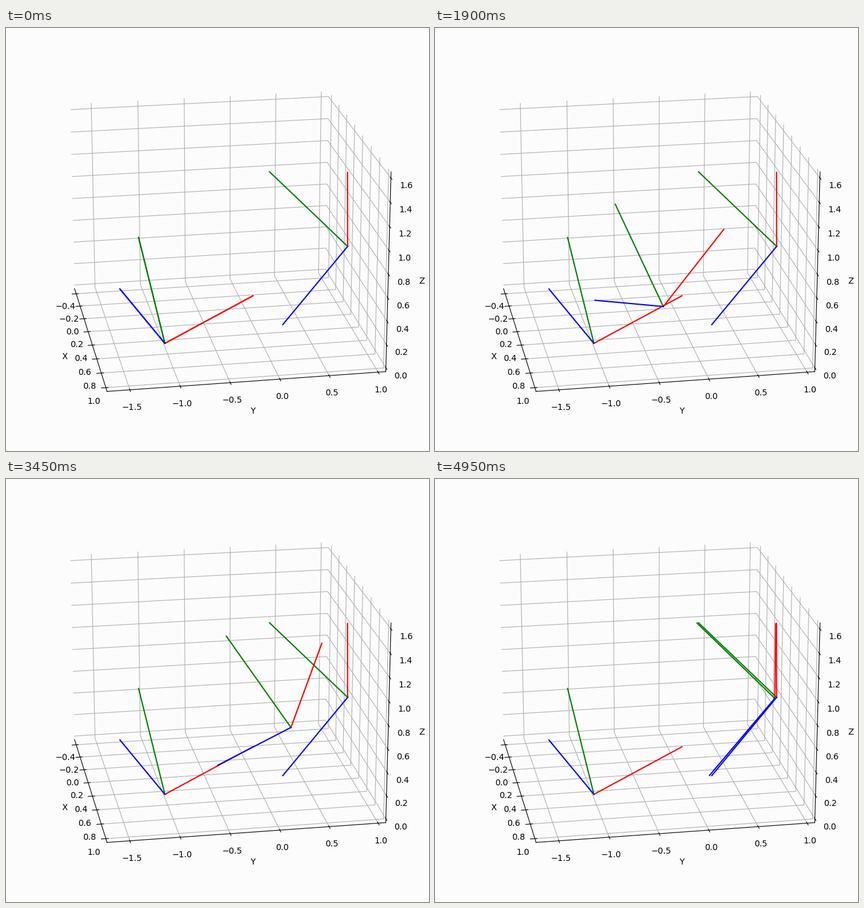
These frames come from a looping animation (700x700 px, 5000 ms). A matplotlib script:

```python
import numpy as np
import matplotlib.pyplot as plt
from matplotlib.animation import FuncAnimation
from matplotlib.ticker import MultipleLocator

FRAMES = 100
INTERVAL = 50
BACKGROUND = "#fcfcfc"
COLORS = ("r", "g", "b")


def rotation(roll, pitch, yaw):
    """Rotation matrix Rz(yaw) Ry(pitch) Rx(roll), angles in degrees."""
    (cr, cp, cy) = np.cos(np.radians([roll, pitch, yaw]))
    (sr, sp, sy) = np.sin(np.radians([roll, pitch, yaw]))
    rx = np.array([[1, 0, 0], [0, cr, -sr], [0, sr, cr]])
    ry = np.array([[cp, 0, sp], [0, 1, 0], [-sp, 0, cp]])
    rz = np.array([[cy, -sy, 0], [sy, cy, 0], [0, 0, 1]])
    return rz @ ry @ rx


def tips(origin, rot):
    """End points of the three unit axes, one per row."""
    return origin + rot.T


start_pos, start_rot = np.array([0.5, -1.0, 0.0]), rotation(32, -30, 75)
end_pos, end_rot = np.array([0.5, 0.9, 0.75]), rotation(145, -60, -25)

# Axis and angle of the turn from the start pose to the end pose.
turn = start_rot.T @ end_rot
angle = np.arccos((np.trace(turn) - 1) / 2)
skew = (turn - turn.T) / (2 * np.sin(angle))


def pose(s):
    """Straight-line position and constant-rate rotation at fraction s."""
    a = s * angle
    step = np.eye(3) + np.sin(a) * skew + (1 - np.cos(a)) * skew @ skew
    return start_pos + s * (end_pos - start_pos), start_rot @ step


fig = plt.figure(figsize=(7, 7), dpi=100, facecolor=BACKGROUND)
ax = fig.add_axes([0, 0, 1, 1], projection="3d", facecolor=BACKGROUND)
ax.view_init(elev=20, azim=-10)

# Limits hug both end poses, with a wider margin on X and Y.
points = np.vstack([start_pos, end_pos,
                    tips(start_pos, start_rot), tips(end_pos, end_rot)])
low, high = points.min(axis=0), points.max(axis=0)
center = (low + high) / 2
half = (high - low) / 2 * np.array([1.1, 1.1, 1.0]) * 25 / 24
ax.set_xlim(center[0] - half[0], center[0] + half[0])
ax.set_ylim(center[1] - half[1], center[1] + half[1])
ax.set_zlim(center[2] - half[2], center[2] + half[2])

for axis, name, step in zip((ax.xaxis, ax.yaxis, ax.zaxis), "XYZ", (0.2, 0.5, 0.2)):
    axis.set_major_locator(MultipleLocator(step))
    axis.set_label_text(name)
    axis.set_pane_color((1, 1, 1, 0))


def make_triad():
    return [ax.plot([], [], [], color=c, lw=1.5)[0] for c in COLORS]


def place(triad, origin, rot):
    for line, tip in zip(triad, tips(origin, rot)):
        line.set_data_3d(*zip(origin, tip))


place(make_triad(), start_pos, start_rot)
place(make_triad(), end_pos, end_rot)
mover = make_triad()


def update(i):
    place(mover, *pose(i / FRAMES))
    return mover


anim = FuncAnimation(fig, update, frames=FRAMES, interval=INTERVAL, repeat=True)
plt.show()
```
